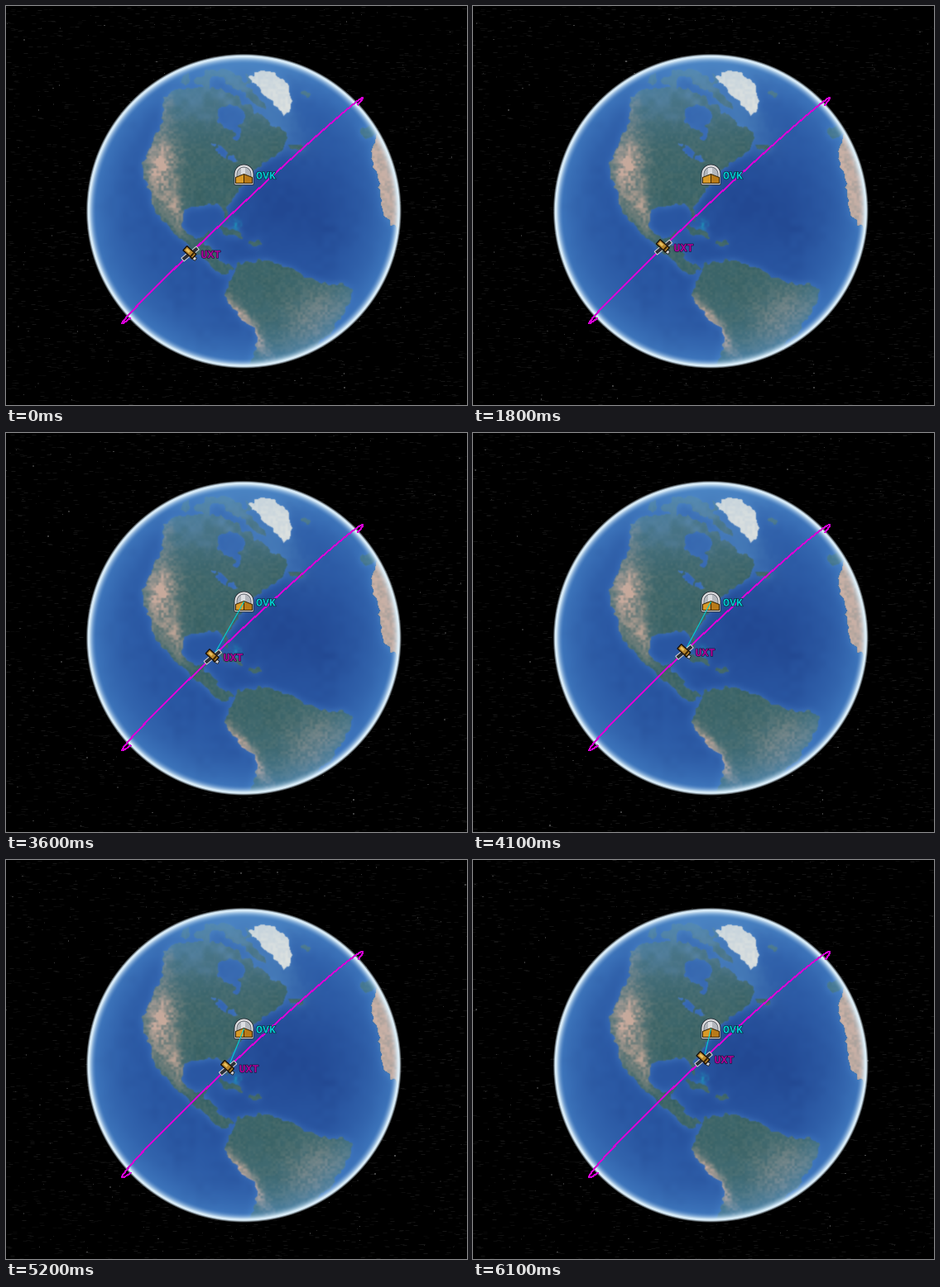
Write a matplotlib script that moves like this. It is 557 px wide and 483 px high and loops after 6.2 s.

```python
import numpy as np
import matplotlib.pyplot as plt
from matplotlib.animation import FuncAnimation
from matplotlib.patches import Polygon
from matplotlib.path import Path
from matplotlib.patheffects import withStroke

W, H, DPI = 557, 483, 64
PX = 72 / DPI                      # one pixel in points
CX, CY, R = 287.3, 248.3, 188.4    # globe
STATION = np.array([287.5, 204.5])
HOLD, STEPS, LINK_FROM = 11, 50, 20

rng = np.random.default_rng(7)
yy, xx = np.mgrid[0:H, 0:W] + 0.5

# Key points of the coasts; a spline and noise fill in the detail.
NORTH_AMERICA = [
    (196, 104), (188, 143), (166, 190), (174, 228), (188, 260), (222, 290),
    (252, 320), (276, 318), (258, 308), (254, 296), (241, 288), (246, 273),
    (232, 281), (214, 268), (218, 246), (257, 241), (269, 263), (271, 238),
    (298, 203), (331, 177), (339, 155), (312, 138), (290, 119), (250, 99)]
SOUTH_AMERICA = [
    (277, 319), (292, 309), (331, 314), (380, 334), (419, 342), (397, 390),
    (366, 417), (345, 442), (297, 442), (303, 400), (276, 368), (266, 350)]
GREENLAND = [(292, 86), (318, 79), (343, 98), (341, 131), (326, 118), (303, 97)]
AFRICA = [(444, 158), (485, 175), (490, 260), (466, 266), (452, 230)]


def noise(step):
    """Smooth value noise in 0..1 with cells of the given size."""
    grid = rng.random((H // step + 3, W // step + 3))
    gx, gy = xx / step, yy / step
    ix, iy = gx.astype(int), gy.astype(int)
    fx, fy = gx - ix, gy - iy
    fx, fy = fx * fx * (3 - 2 * fx), fy * fy * (3 - 2 * fy)
    top = grid[iy, ix] * (1 - fx) + grid[iy, ix + 1] * fx
    low = grid[iy + 1, ix] * (1 - fx) + grid[iy + 1, ix + 1] * fx
    return top * (1 - fy) + low * fy


def blur(a, s):
    n = int(np.ceil(2.5 * s))
    k = np.exp(-0.5 * (np.arange(-n, n + 1) / s) ** 2)
    k /= k.sum()
    for axis in (0, 1):
        a = sum(w * np.roll(a, d, axis) for w, d in zip(k, range(-n, n + 1)))
    return a


wx = xx + 5 * (noise(5) - 0.5) + 4 * (noise(12) - 0.5)
wy = yy + 5 * (noise(5) - 0.5) + 4 * (noise(12) - 0.5)


def glow(x, y, rx, ry, deg=0):
    """Soft tilted ellipse, 1 in its middle."""
    c, s = np.cos(np.radians(deg)), np.sin(np.radians(deg))
    u, v = (wx - x) * c + (wy - y) * s, (wy - y) * c - (wx - x) * s
    return np.exp(-(u / rx) ** 2 - (v / ry) ** 2)


def oval(*args):
    return (glow(*args) > np.exp(-1)).astype(float)


def coast(points):
    """Mask of a closed Catmull-Rom curve through the points."""
    p1 = np.array(points, float)[:, None]
    p0, p2, p3 = (np.roll(p1, k, 0) for k in (1, -1, -2))
    t = np.linspace(0, 1, 6, endpoint=False)[:, None]
    curve = p1 + 0.5 * t * (p2 - p0 + t * (2 * p0 - 5 * p1 + 4 * p2 - p3
                                           + t * (3 * (p1 - p2) + p3 - p0)))
    pixels = np.column_stack([wx.ravel(), wy.ravel()])
    return Path(curve.reshape(-1, 2)).contains_points(pixels).reshape(H, W) * 1.0


def mix(img, color, amount):
    a = np.clip(amount, 0, 1)[..., None]
    return img * (1 - a) + np.array(color, float) * a


def paint_globe():
    fine, mid, wide = noise(3), noise(9), noise(30)
    grain = 0.5 * fine + 0.3 * mid + 0.2 * wide

    desert, ice = coast(AFRICA), coast(GREENLAND)
    islands = [oval(298, 110, 20, 6, 45), oval(350, 170, 8, 4, 20),     # Baffin, Newfoundland
               oval(362, 107, 5, 3), oval(272, 274, 18, 3, 20),         # Iceland, Cuba
               oval(302, 286, 8, 3), oval(436, 152, 7, 6),              # Hispaniola, Iberia
               oval(253, 91, 42, 13) * (mid > 0.42)]                    # Arctic islands
    bays = [oval(272, 135, 17, 14), oval(279, 152, 5, 12),
            oval(263, 178, 18, 4, 35) * (fine > 0.35)]
    land = np.maximum.reduce([coast(NORTH_AMERICA), coast(SOUTH_AMERICA), desert, *islands])
    land *= 1 - np.maximum.reduce(bays)
    shelf = blur(np.maximum(land, ice), 5)

    sea = np.full((H, W, 3), (42, 88, 164), float)
    sea = mix(sea, (34, 72, 146), 0.75 * glow(350, 245, 75, 65) + 0.5 * mid * wide)
    sea = mix(sea, (66, 120, 194), 1.1 * shelf * (0.6 + 0.5 * mid))
    sea = mix(sea, (66, 118, 186), 0.6 * glow(272, 140, 18, 22))
    sea = mix(sea, (84, 140, 192), 0.6 * glow(320, 130, 50, 22, 45))
    sea = mix(sea, (30, 146, 185), 0.8 * glow(277, 266, 4, 7) * (0.5 + fine))

    soil = np.full((H, W, 3), (62, 103, 108), float)
    soil = mix(soil, (46, 88, 90), 0.6 * mid)
    soil = mix(soil, (104, 128, 122), 0.7 * (grain - 0.3))
    soil = mix(soil, (86, 128, 158), 0.75 * glow(262, 108, 85, 42) * (0.4 + mid))
    dry = (1.2 * glow(186, 196, 20, 42) + 0.8 * glow(205, 248, 11, 26, -20)   # west, Mexico
           + 1.2 * glow(292, 390, 42, 9, 55)                                  # Andes
           + 0.5 * glow(375, 380, 40, 28, -45) + 0.4 * glow(195, 130, 6, 24)) # Brazil, Rockies
    soil = mix(soil, (202, 170, 154), dry * (0.15 + 1.1 * grain))
    soil = mix(soil, (216, 180, 160), desert * (0.8 + 0.25 * fine))

    cover = blur(land, 0.7)[..., None]
    img = sea * (1 - cover) + soil * cover
    img = mix(img, (222, 226, 224), blur(ice, 0.7) * (0.92 + 0.1 * fine))

    r = np.hypot(xx - CX, yy - CY) / R
    clear = (1 - 0.7 * desert) * (1 - 0.8 * ice)
    img = mix(img, (96, 150, 198), 0.45 * glow(290, 70, 110, 28) * clear)
    img = mix(img, (84, 152, 216), 0.6 * np.clip(r, 0, 1) ** 6 * clear)
    img = mix(img, (222, 240, 250), 0.95 * np.clip((r - 0.945) / 0.045, 0, 1) ** 2)
    alpha = np.clip((1.012 - r) / 0.014, 0, 1)
    return np.dstack([img / 255, alpha]).clip(0, 1)


fig = plt.figure(figsize=(W / DPI, H / DPI), dpi=DPI, facecolor="black")
ax = fig.add_axes([0, 0, 1, 1])
ax.set(xlim=(0, W), ylim=(H, 0))
ax.axis("off")


def star_layer(n, low, high, marker, size):
    pos = rng.random((n, 2)) * (W, H)
    gray = low + (high - low) * rng.random(n) ** 3
    art = ax.scatter(*pos.T, c=np.repeat(gray[:, None] / 255, 3, 1), marker=marker,
                     s=(size * PX) ** 2, linewidths=0 if marker == "s" else PX, zorder=1)
    return art, pos


layers = [star_layer(3000, 9, 24, "_", 5),
          star_layer(300, 20, 60, "s", 1.2),
          star_layer(35, 50, 110, "s", 1.4)]

ax.imshow(paint_globe(), extent=(0, W, H, 0), interpolation="nearest",
          aspect="auto", zorder=2)


def shape(pts, fill, edge="none", lw=0.0, z=5):
    return ax.add_patch(Polygon(pts, closed=True, facecolor=fill, edgecolor=edge,
                                linewidth=lw * PX, zorder=z))


def bar(x, y, w, h, deg):
    """Corners of a turned rectangle."""
    c, s = np.cos(np.radians(deg)), np.sin(np.radians(deg))
    box = np.array([(-1, -1), (1, -1), (1, 1), (-1, 1)]) * (w / 2, h / 2)
    return box @ np.array([(c, s), (-s, c)]) + (x, y)


def label(x, y, s, color):
    return ax.text(x, y, s, color=color, family="Liberation Mono", weight="bold",
                   fontsize=13.3 * PX, va="baseline", zorder=8,
                   path_effects=[withStroke(linewidth=1.2 * PX, foreground="#101830")])


def dome(r, base):
    t = np.linspace(np.pi, 2 * np.pi, 16)
    arc = np.column_stack([r * np.cos(t), r * np.sin(t) - 1])
    return np.vstack([arc, (r, base), (-r, base)]) + STATION


shape(dome(11.5, 12), "#e0e0e2", "#20242c", 0.8)
shape(dome(8.5, 4), "#b4b8be", "#5a5e66", 0.8)
shape(bar(*(STATION + (-1.5, -3)), 5, 11, 0), "#dcdee2")
for side, tone in ((-1, "#d89a28"), (1, "#b87a18")):
    wall = np.array([(0, -1), (10 * side, 3), (10 * side, 10), (0, 10)])
    shape(wall + STATION, tone, "#3a2808", 1)
label(302, 209.5, "OVK", "#00c8cc")

orbit, = ax.plot([], [], color="#d400d4", lw=0.8 * PX, antialiased=False, zorder=6)
link, = ax.plot([], [], color="#00d0d4", lw=1.1 * PX, zorder=6)

SAT = [(bar(-6, 5, 9, 5, -40), "#2c3038", "#d8d8dc", 1.0),
       (bar(6, -4, 7, 5, -40), "#2c3038", "#d8d8dc", 1.0),
       (bar(4, 6, 6, 4, 30), "#d0d0d4", "#202020", 0.8),
       (bar(-1, -1, 15, 7, 42), "#b8862c", "#181008", 1.4),
       (bar(-3, -3, 5, 3, 42), "#e8c060", "none", 0),
       (bar(2, 2, 2, 6, 42), "#3a2408", "none", 0)]
sat = [shape(*part, z=7) for part in SAT]
tag = label(0, 0, "UXT", "#b0009c")

MID = np.array([285.8, 247.6])
TILT = np.radians(-43.2)
AXIS = np.array([np.cos(TILT), np.sin(TILT)])
NORMAL = np.array([np.sin(TILT), -np.cos(TILT)])


def on_orbit(theta, b):
    """Point on the tilted ring; theta = 0 is the near middle."""
    theta = np.asarray(theta)[..., None]
    return MID + 199.5 * np.sin(theta) * AXIS + b * np.cos(theta) * NORMAL


def update(i):
    p = max(0, i - HOLD)
    b = 6 + 0.08 * p

    for art, pos in layers:
        art.set_offsets((pos + (0.45 * p, -0.04 * p)) % (W, H))

    theta = np.linspace(-np.pi / 2, 1.5 * np.pi, 721)
    ring = on_orbit(theta, b)
    hidden = (np.cos(theta) < 0) & (np.hypot(*(ring - (CX, CY)).T) < R)
    ring[hidden] = np.nan
    orbit.set_data(*ring.T)

    x, y = on_orbit(np.radians(-24 * (1 - p / STEPS)), b)
    for patch, part in zip(sat, SAT):
        patch.set_xy(part[0] + (x, y))
    tag.set_position((round(x) + 12.5, round(y) + 6))

    link.set_data([STATION[0], x], [STATION[1], y])
    link.set_visible(p >= LINK_FROM)
    return [orbit, link, tag, *sat]


anim = FuncAnimation(fig, update, frames=HOLD + 1 + STEPS, interval=100,
                     repeat=True, repeat_delay=0, blit=False)
plt.show()
```
